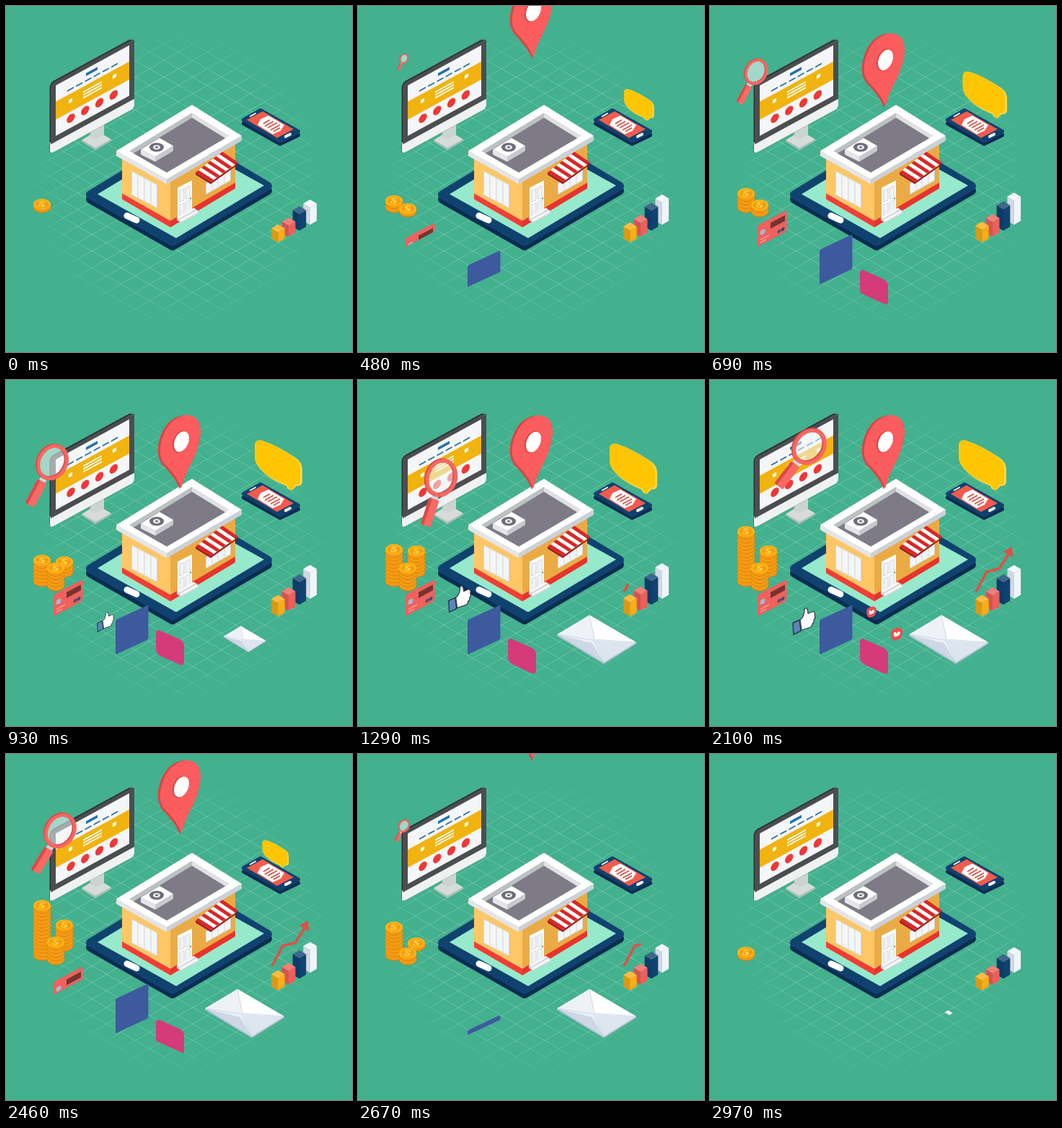
An HTML page that plays this animation: 480x480 px, repeating every 3000 ms.

```html
<!DOCTYPE html>
<html lang="en">
<head>
<meta charset="utf-8">
<title>Isometric online shop</title>
<style>
html, body { margin: 0; width: 100%; height: 100%; overflow: hidden; background: #43b08e; }
svg { display: block; width: 100vw; height: 100vh; }
</style>
</head>
<body>
<svg viewBox="0 0 480 480">
  <defs>
    <radialGradient id="fade" gradientUnits="userSpaceOnUse" cx="240" cy="240" r="214">
      <stop offset=".72" stop-color="#fff"/><stop offset="1" stop-color="#000"/>
    </radialGradient>
    <mask id="disc"><rect width="480" height="480" fill="url(#fade)"/></mask>
    <clipPath id="hole"><path d="M171 201L258 148 310 180 223 231Z"/></clipPath>
    <clipPath id="ground1"><rect x="-5" y="-60" width="60" height="117"/></clipPath>
    <clipPath id="ground2"><rect x="-5" y="-60" width="60" height="101"/></clipPath>
    <clipPath id="ground3"><rect x="-5" y="-60" width="60" height="96"/></clipPath>
    <g id="coin">
      <path d="M-12 0V4A12 7.5 0 0 0 12 4V0Z" fill="#f39a14"/>
      <path d="M-12 4A12 7.5 0 0 0 12 4" fill="none" stroke="#d97c0b"/>
      <ellipse rx="12" ry="7.5" fill="#fdb515"/>
      <ellipse rx="8.8" ry="5.3" fill="#f79a12"/>
      <path d="M4-2C1-5-5-3-3-1S5 0 3 2-3 4-5 1M-2-4L2 4" fill="none" stroke="#ffd23f" stroke-width="1.5"/>
    </g>
    <g id="like">
      <path d="M-8-2Q-7-8 2-9 9-9 8-1 7 7-2 9-8 10-8-2Z" fill="#ee4d4f"/>
      <path d="M-3 4Q-6-2-2-3L0-1Q3-6 5-2 4 3-3 4Z" fill="#fff"/>
    </g>
  </defs>

  <rect width="480" height="480" fill="#43b08e"/>
  <path id="grid" mask="url(#disc)" fill="none" stroke="#8fdcc0" stroke-opacity=".5"/>

  <!-- monitor -->
  <path d="M105 186L126 173 146 185 124 197Z" fill="#d6dcda"/>
  <path d="M105 186L124 197 146 185V187L124 200 105 188Z" fill="#b3bdb9"/>
  <path d="M117 172L136 162V178L124 185 117 181Z" fill="#ccd4d1"/>
  <g transform="matrix(1 -.545 0 1 62 108)">
    <rect x="-1.5" y="-2" width="115" height="99" rx="6" fill="#2d3035"/>
    <path d="M-1 81H116V91Q116 97 111 97H5Q-1 97-1 92Z" fill="#f0f2f2"/>
    <path d="M0 84V5Q0 0 5 0H111Q116 0 116 5V84Z" fill="#4b4d51"/>
    <rect x="7" y="6" width="102" height="70" fill="#f5f6f7"/>
    <rect x="7" y="28.5" width="102" height="25" fill="#f0b310"/>
    <rect x="49" y="12" width="16" height="4" fill="#2272a4"/>
    <path d="M23 22.5H93" stroke="#2b70a0" stroke-width="2" stroke-dasharray="9 3.2"/>
    <path d="M45 36H71M45 40H71M45 44H71" stroke="#fff" stroke-width="2"/>
    <path d="M25 36h5v5h-5zM86 35h5v5h-5z" fill="#fff"/>
    <path d="M28 63H88" stroke="#ee3838" stroke-width="11.5" stroke-linecap="round" stroke-dasharray="0 19.8"/>
  </g>

  <!-- tablet -->
  <g stroke-linejoin="round" stroke-width="12">
    <path d="M117 268L231 333 363 256 249 188Z" fill="#0a2c50" stroke="#0a2c50"/>
    <path d="M117 262L231 327 363 250 249 182Z" fill="#10426f" stroke="#10426f"/>
  </g>
  <path d="M127 261L236 322 358 249 248 188Z" fill="#96e9cb"/>
  <path d="M168 291L181 297" stroke="#fff" stroke-width="9" stroke-linecap="round"/>

  <!-- shop -->
  <path d="M161 203L228 241V307L161 268Z" fill="#fdc765"/>
  <path d="M228 241L318 188V253L228 307Z" fill="#eaab45"/>
  <path d="M161 260L228 298V307L161 268Z" fill="#f03e36"/>
  <path d="M228 298L318 245V253L228 307Z" fill="#e8332d"/>
  <g fill="#f4f5f5" stroke="#d3d6d8">
    <path d="M174.500 229L209.500 248V280L174.500 262Z"/>
    <path d="M183 234V266M192 239V271M201 244V275"/>
    <path d="M277.500 246L311.500 227V242L277.500 261Z"/>
    <path d="M286 242V256M294 237V251M303 232V246"/>
  </g>
  <path d="M238 252L258 242V285L238 296Z" fill="#fff"/>
  <path d="M241 256L247 253V269L241 272ZM249 252L255 249V265L249 268ZM241 276L247 273V288L241 291ZM249 272L255 269V284L249 287Z" fill="#f2f3f5" stroke="#c9ccd2" stroke-width=".8"/>
  <circle cx="256" cy="267" r="1" fill="#555"/>
  <path d="M237 293L260 280 267 284V288L243 301 237 297Z" fill="#d2d5da"/>
  <path d="M237 293L260 280 263 282 240 295ZM240 297L264 284 267 286 243 299Z" fill="#f7f8f9"/>
  <path d="M263 231L284 244 322 218V220L284 247 263 234Z" fill="#9c1d22"/>
  <g id="awning"></g>
  <path d="M153 201L223 240V247L153 208Z" fill="#e3e5e9"/>
  <path d="M223 240L327 180V187L223 247Z" fill="#cdd0d7"/>
  <path d="M153 201L258 137 327 180 223 240Z" fill="#fff"/>
  <g clip-path="url(#hole)">
    <path d="M171 201L258 148V240H171Z" fill="#bcc2c3"/>
    <path d="M258 148L310 180V240H258Z" fill="#dfe1e4"/>
    <path d="M171 208L258 155 310 187 223 238Z" fill="#7e7b87"/>
  </g>
  <path d="M187 199L207 209V216L187 206Z" fill="#e4e6e9"/>
  <path d="M207 209L232 194V201L207 216Z" fill="#c7cad0"/>
  <path d="M187 199L213 183 232 194 207 209Z" fill="#fff"/>
  <ellipse cx="209" cy="196" rx="10" ry="6.2" fill="#6f6d79"/>
  <ellipse cx="209" cy="196" rx="5" ry="3.2" fill="#f0f0f2"/>
  <ellipse cx="209" cy="196" rx="2.2" ry="1.4" fill="#777480"/>

  <!-- phone -->
  <g stroke-linejoin="round" stroke-width="6">
    <path d="M330 163L353 150 405 179 380 191Z" fill="#0a2c50" stroke="#0a2c50"/>
    <path d="M330 158L353 145 405 174 380 187Z" fill="#10426f" stroke="#10426f"/>
  </g>
  <path d="M334 158L356 146 399 171 376 183Z" fill="#f15b4c"/>
  <path d="M339 153L346 149" stroke="#fff" stroke-width="2" stroke-linecap="round"/>
  <path d="M388 181L394 178" stroke="#fff" stroke-width="4" stroke-linecap="round"/>
  <path d="M349 165L353 157 364 152 386 165 381 173 370 178Z" fill="#fff"/>
  <path d="M357 163l9-5M359 167l12-7M363 169l13-7M367 172l13-7M371 174l9-5" stroke="#dd4a40" stroke-width="1.5"/>

  <g id="bars"></g>
  <path id="trend" d="M369 294L384 266 401 262 417 237" fill="none" stroke="#e04f43" stroke-width="3.6" stroke-linejoin="round" pathLength="1" stroke-dasharray="1 2"/>
  <path id="head" d="M407 238L419 231 420 246Z" fill="#e04f43"/>

  <g id="bubble">
    <path d="M345 90Q346 82 355 84 375 90 402 108 411 114 411 124V142Q410 148 403 147L397 153Q391 153 389 147 365 138 352 123 345 115 345 106Z" fill="#ffd740"/>
    <path d="M345 90Q346 83 353 84 375 90 400 108 408 114 408 124V139Q408 146 401 145L396 153Q392 151 390 145 365 137 352 122 345 115 345 106Z" fill="#ffc502"/>
  </g>

  <g id="pin">
    <path d="M241 151Q236 136 217 117 207 104 213 82 222 51 248 48L258 51 252 120Z" fill="#d94545"/>
    <path d="M243 150Q239 134 220 116 210 104 216 83 225 52 250 48 271 48 270 74 268 96 254 121 246 138 243 150Z" fill="#fb5c5d"/>
    <ellipse cx="242" cy="85" rx="10" ry="16" transform="rotate(23 242 85)" fill="#d94545"/>
    <ellipse cx="243.5" cy="85" rx="9.5" ry="15" transform="rotate(23 243.5 85)" fill="#fff"/>
  </g>

  <g id="coins"></g>

  <g transform="matrix(1 -.53 0 1 66 298)" clip-path="url(#ground3)">
    <g id="card">
      <rect width="40.5" height="30" rx="2.5" fill="#ee615d"/>
      <rect x="18" y="6" width="20" height="8" fill="#75332f"/>
      <circle cx="7" cy="13" r="3.6" fill="#a9b9c9"/>
      <path d="M4 22H16M4 26H12" stroke="#f6aaa5" stroke-width="1.4"/>
      <circle cx="30" cy="24" r="2.5" fill="#5a4a66"/><circle cx="35" cy="24" r="2.5" fill="#2f4c77"/>
    </g>
  </g>

  <g id="thumb" stroke-linejoin="round">
    <path d="M1 22L10 18 12 33 2 38Z" fill="#5e85b8" stroke="#26384f" stroke-width="1.4"/>
    <path d="M11 18Q17 13 17 3 21-2 22 9L29 6Q33 8 31 12 33 15 30 18 31 21 28 23 28 27 25 28L13 32Z" fill="#fff" stroke="#333f4a" stroke-width="1.3"/>
  </g>
  <g transform="matrix(1 -.467 0 1 152 333)" clip-path="url(#ground1)">
    <rect id="blue" width="45.5" height="48" rx="2" fill="#3d5a9e"/>
  </g>
  <use id="like1" href="#like"/>
  <use id="like2" href="#like"/>
  <g transform="matrix(1 .45 0 1 208 357)" clip-path="url(#ground2)">
    <rect id="pink" width="39" height="35" rx="6" fill="#d43b78"/>
  </g>

  <g id="mail">
    <path d="M-55-6L-10-33 55 5 10 33Z" fill="#eef2f8"/>
    <path d="M-55-6L10 33-6 6Z" fill="#cdd7e5"/>
    <path d="M10 33L55 5-3 2Z" fill="#dde5ef"/>
    <path d="M-10-33L55 5Q0 3-3 1Z" fill="#fff"/>
    <path d="M-10-33L-3 1 55 5M-55-6L-4 2 10 33" fill="none" stroke="#c5ced9" stroke-width=".8"/>
    <path d="M-55-6L10 33 55 5V7L10 35-55-4Z" fill="#b4c1d2"/>
  </g>

  <g id="lens">
    <path d="M-5 27H5V34H-5Z" fill="#cfd5da"/>
    <rect x="-7.500" y="32" width="15" height="40" rx="2" fill="#fa6a64"/>
    <path d="M-7.500 33H-3V72H-5Q-7.500 72-7.500 70Z" fill="#d94b48"/>
    <ellipse rx="20" ry="25" fill="#f3f7fa" fill-opacity=".55"/>
    <ellipse cx="-1" rx="20" ry="25" fill="none" stroke="#d94b48" stroke-width="6"/>
    <ellipse cx=".5" rx="20" ry="25" fill="none" stroke="#fb6661" stroke-width="5"/>
  </g>
</svg>
<script>
const { PI, sin, cos, min, max, floor } = Math;
const $ = id => document.getElementById(id);
const lerp = (a, b, u) => a + (b - a) * u;
const ramp = (t, a, b) => min(1, max(0, (t - a) / (b - a)));
const ease = (t, a, b) => (1 - cos(PI * ramp(t, a, b))) / 2;
const easeIn = (t, a, b) => ramp(t, a, b) ** 2;
const easeOut = (t, a, b) => 1 - (1 - ramp(t, a, b)) ** 2;
const easeBack = (t, a, b, pull = 2.6) => {
  const v = ramp(t, a, b) - 1;
  return 1 + (pull + 1) * v ** 3 + pull * v * v;
};
const move = (id, x, y, s = 1, r = 0) =>
  $(id).setAttribute('transform', `translate(${x} ${y}) rotate(${r}) scale(${s})`);
const show = (id, on) => $(id).style.display = on ? '' : 'none';

let lines = '';
for (let y = -120; y < 610; y += 23) lines += `M0 ${y}l480 277M0 ${y}l480-277`;
$('grid').setAttribute('d', lines);

// Nine stripes run from the wall to the front edge.
let stripes = '';
for (let i = 0; i < 9; i++) {
  const wall = k => [lerp(263, 300, k / 9), lerp(231, 202, k / 9)];
  const front = k => [lerp(284, 322, k / 9), lerp(244, 217, k / 9)];
  stripes += `<path d="M${wall(i)}L${wall(i + 1)}L${front(i + 1)}L${front(i)}Z" fill="${i % 2 ? '#fff' : '#d9262c'}"/>`;
}
$('awning').innerHTML = stripes;

// colour, height, growth; from back to front
const bars = [['#f1f5fb', 24, 14.5], ['#10426f', 23, 10], ['#ef5f58', 15.5, 7], ['#fbad12', 14, 6]];
function drawBar([color, height, growth], i, grow) {
  const x = 421.8 - 14.8 * i, y = 303.5 + 8.2 * i, h = height + growth * grow;
  const side = d => `<path d="M${x} ${y}${d}Z" fill="${color}"/>`;
  const tint = (d, paint) => side(d) + `<path d="M${x} ${y}${d}Z" fill="${paint}"/>`;
  return tint(`l-9.3-5.5v${-h}l9.3 5.5`, 'rgba(0,20,60,.13)') +
    side(`l9.3-5.5v${-h}l-9.3 5.5`) +
    tint(`m0 ${-h}l-9.3-5.5 9.3-5.5 9.3 5.5`, 'rgba(255,255,255,.2)');
}

function drawPile(x, y, count) {
  let pile = '';
  for (let i = 0; i < floor(count); i++) pile += `<use href="#coin" x="${x}" y="${y - i * 5}"/>`;
  return pile;
}

function draw(t) {
  const grow = sin(PI * t / 3000);
  $('bars').innerHTML = bars.map((bar, i) => drawBar(bar, i, grow)).join('');

  const count = (n, a, b, end) => n * (ramp(t, a, b) - ramp(t, 2470, end));
  $('coins').innerHTML = drawPile(81, 262, count(6, 600, 1250, 2760)) +
    drawPile(50, 275, 1 + count(13, 350, 1750, 2960)) +
    drawPile(69, 281, count(5, 350, 930, 2880));

  const bob = 4.5 * (1 - cos((t - 900) / 390 * 2 * PI)) * (ramp(t, 800, 930) - ramp(t, 2070, 2160));
  move('pin', 0, 1 - bob - 162 * (1 - ease(t, 150, 800) + easeIn(t, 2220, 2700)));

  const gone = ease(t, 2250, 2700), size = easeOut(t, 240, 850) - gone;
  const sway = (1 - cos((t - 930) / 1170 * 2 * PI)) / 2;
  move('bubble', 396 + 6 * sway - 36 * gone - 396 * size, 153 + 7 * sway - 153 * size, size);

  const out = ease(t, 600, 1100) - ease(t, 2150, 2400), lift = sin(PI * ramp(t, 1100, 2100));
  move('thumb', lerp(160, 114, out) + 19 * lift, lerp(338, 315, out) - 55 * lift, out);

  const across = ease(t, 900, 1680) - ease(t, 1800, 2640);
  const wave = sin(2 * PI * ramp(t, 930, 2550));
  move('lens', 64 + 103 * across, 73 + 41 * (ease(t, 480, 930) - ease(t, 2550, 2850)) + 22 * wave,
    .97 * (easeOut(t, 390, 1050) - ease(t, 2400, 2850)), 28 - 10 * wave);

  // These slide up out of the ground and sink back.
  move('blue', 0, 60 * (1 - easeOut(t, 300, 850) + easeIn(t, 2340, 2700)));
  move('pink', 0, 60 * (1 - easeBack(t, 510, 1320) + easeIn(t, 2300, 2700)));
  move('card', 0, 38 * (1 - easeOut(t, 370, 910) + easeIn(t, 2280, 2540)));

  move('mail', 331, 359, ease(t, 690, 1150) - ramp(t, 2700, 3000));

  const pop = ease(t, 1260, 1560) - ease(t, 2160, 2400), drift = ease(t, 1500, 2100);
  move('like1', lerp(236, 224, drift), 322, .85 * pop);
  move('like2', lerp(249, 259, drift), lerp(350, 352.5, drift), pop);

  const drawn = ramp(t, 1200, 1770) - ramp(t, 2500, 2850);
  $('trend').setAttribute('stroke-dashoffset', 1 - drawn);
  show('trend', drawn > 0);
  show('head', drawn > .97);
}

const start = performance.now();
function tick() {
  const t = (performance.now() - start) % 3000;
  draw(floor(t / 30) * 30);
  requestAnimationFrame(tick);
}
tick();
</script>
</body>
</html>
```
